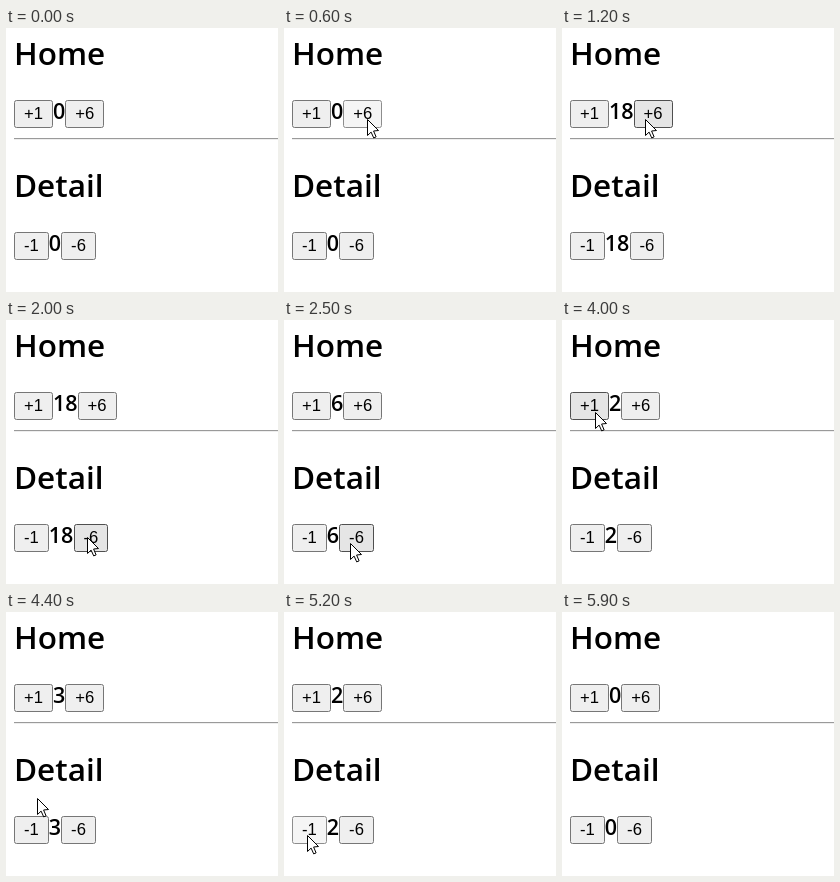
An HTML page with a canvas for the animation above (6.2 s loop, 272 by 264 pixels).

```html
<!DOCTYPE html>
<html lang="en">
<head>
<meta charset="utf-8">
<title>Shared counter</title>
<style>
  html, body { margin: 0; width: 100%; height: 100%; overflow: hidden; background: #fff; }
  canvas { display: block; }
</style>
</head>
<body>
<canvas id="stage" width="272" height="264"></canvas>
<script>
const ctx = document.getElementById('stage').getContext('2d');
const LOOP = 6200, TICK = 100;
const BOLD = '"Open Sans", "Noto Sans", sans-serif';
const PLAIN = '"Liberation Sans", Arial, sans-serif';
const DIGIT = 12.37;
const ENTER = 100, LEAVE = 5900;

// each step and the moments at which its button is released
const clicks = [
  { step: 6, at: [700, 1000, 1200] },
  { step: -6, at: [2100, 2400, 2700] },
  { step: 1, at: [3700, 3900, 4100] },
  { step: -1, at: [5000, 5300, 5500] }
];

// eased pointer trips, each from where the last one ended
const home = { x: 222, y: 66 };
const trips = [
  { at: 0, ms: 320, x: 83, y: 91 },
  { at: 1400, ms: 320, x: 83, y: 214 },
  { at: 1900, ms: 200, x: 78, y: 219 },
  { at: 2200, ms: 200, x: 66, y: 223 },
  { at: 2800, ms: 650, x: 33, y: 92 },
  { at: 4100, ms: 450, x: 30, y: 219 },
  { at: 4550, ms: 150, x: 24, y: 235 },
  { at: 4700, ms: 200, x: 23, y: 223 },
  { at: 5600, ms: 320, x: 331, y: 240 }
];

const clamp = u => Math.min(1, Math.max(0, u));
const smooth = u => u * u * (3 - 2 * u);

function countAt(t) {
  return clicks.reduce((sum, c) => sum + c.step * c.at.filter(a => a <= t).length, 0);
}

function pointerAt(t) {
  if (t < ENTER || t >= LEAVE) return null;
  let { x, y } = home;
  for (const trip of trips) {
    const k = smooth(clamp((t - trip.at) / trip.ms));
    x += (trip.x - x) * k;
    y += (trip.y - y) * k;
  }
  return { x: Math.round(x), y: Math.round(y) };
}

// a press shows one tick before release, unless the click is rapid or the pointer moves
function pressedAt(t) {
  const now = pointerAt(t), before = pointerAt(t - TICK);
  if (!now || !before || now.x !== before.x || now.y !== before.y) return false;
  return clicks.some(c => c.at.some((a, i) =>
    a === t + TICK && !(i && a - c.at[i - 1] <= 2 * TICK)));
}

function text(str, x, y, font, align = 'left') {
  ctx.font = font;
  ctx.textAlign = align;
  ctx.fillStyle = '#000';
  ctx.fillText(str, x, y);
}

function button(label, left, y, width, pointer, down) {
  const x = Math.round(left), w = Math.round(left + width) - x, h = 28;
  const over = pointer && pointer.x >= x && pointer.x < x + w &&
    pointer.y >= y && pointer.y < y + h;
  const [fill, line] = !over ? ['#efefef', '#767676']
    : down ? ['#f5f5f5', '#8d8d8d'] : ['#e5e5e5', '#4f4f4f'];
  ctx.beginPath();
  ctx.roundRect(x + .5, y + .5, w - 1, h - 1, 2);
  ctx.fillStyle = fill;
  ctx.fill();
  ctx.lineWidth = 1;
  ctx.strokeStyle = line;
  ctx.stroke();
  text(label, left + width / 2, y + 19, '16.67px ' + PLAIN, 'center');
}

function section(title, sign, top, w, count, pointer, down) {
  text(title, 8, top + 37, '600 31.5px ' + BOLD);
  const y = top + 72, digits = String(count);
  button(sign + 1, 8, y, w, pointer, down);
  text(digits, 8 + w, y + 19, '600 21.5px ' + BOLD);
  button(sign + 6, 8 + w + digits.length * DIGIT, y, w, pointer, down);
}

function arrow({ x, y }) {
  ctx.save();
  ctx.translate(x + .5, y + .5);
  ctx.beginPath();
  ctx.moveTo(0, 0);
  for (const [px, py] of [[0, 16], [3.6, 12.6], [6.2, 18.4], [8.6, 17.4], [6.1, 11.5], [11, 11]])
    ctx.lineTo(px, py);
  ctx.closePath();
  ctx.fillStyle = '#fff';
  ctx.fill();
  ctx.lineWidth = 1;
  ctx.strokeStyle = '#000';
  ctx.stroke();
  ctx.restore();
}

function draw(t) {
  const count = countAt(t), pointer = pointerAt(t), down = pressedAt(t);
  ctx.fillStyle = '#fff';
  ctx.fillRect(0, 0, 272, 264);
  section('Home', '+', 0, 38.9, count, pointer, down);
  ctx.fillStyle = '#9a9a9a';
  ctx.fillRect(8, 110, 264, 1);
  ctx.fillStyle = '#eee';
  ctx.fillRect(8, 111, 264, 1);
  section('Detail', '-', 132, 34.77, count, pointer, down);
  if (pointer) arrow(pointer);
}

const start = performance.now();
function frame() {
  const t = (performance.now() - start) % LOOP;
  draw(Math.floor(t / TICK) * TICK);
  requestAnimationFrame(frame);
}
frame();
</script>
</body>
</html>
```
